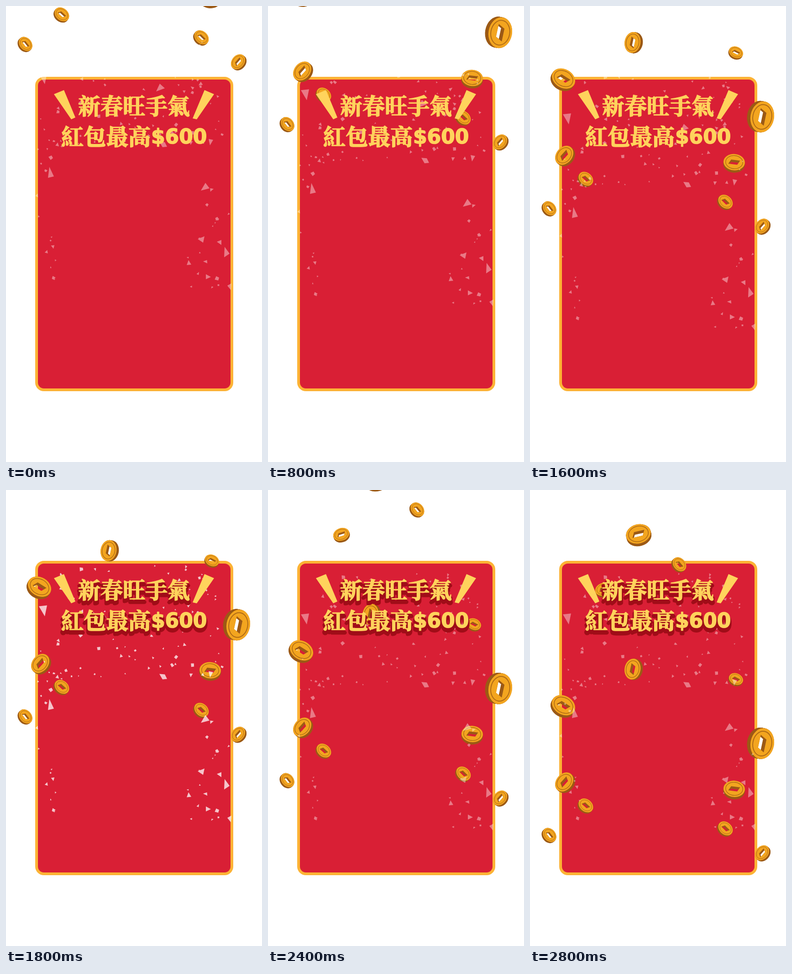
An HTML page with a canvas for the animation above (3.1 s loop, 561 by 998 pixels).

```html
<!DOCTYPE html>
<html lang="zh-Hant">
<head>
<meta charset="utf-8">
<style>
  html, body { margin: 0; width: 100%; height: 100%; overflow: hidden; background: #fff; }
  canvas { display: block; }
</style>
</head>
<body>
<canvas id="stage" width="561" height="998"></canvas>
<script>
const ctx = document.getElementById('stage').getContext('2d');
const LOOP = 3100, TICK = 200, LAST_TICK = 14, ROW = 17.6;
const GOLD = '#ffd35c', FACE = '#f3a51f', EDGE = '#9c5a16', RED = '#d91f35', SHADE = '#a00d18';

// x, y, radius and tilt of each coin at the start of the loop
const coins = [
  [43, 83, 17, 50], [122.5, 18.2, 17.5, 40], [428.5, 68.5, 17.5, 42], [508.5, 122, 18, -50],
  [75, -33, 23, -50], [447.5, -18, 23.5, 5], [509, -117, 34, 100], [73.5, -201, 27, 30],
  [224.7, -280, 23, -80], [451.5, -258.5, 16, 25], [327.5, -509.5, 17, 48],
  [160.5, -455, 18, -20], [237.5, -576, 27.5, -15]
];

// Coins fall slowly, speed up halfway and hesitate once: [tick, distance]
const fallKeys = [[0, 0], [7, 307], [11, 518], [12, 552], [14, 672]];

function fallAt(tick) {
  const next = Math.max(1, fallKeys.findIndex(([key]) => key >= tick));
  const [t0, d0] = fallKeys[next - 1], [t1, d1] = fallKeys[next];
  return d0 + (d1 - d0) * (tick - t0) / (t1 - t0);
}

// Confetti drops a row every two ticks, later every three; title shadow blinks along
function stateAt(tick) {
  const early = tick < 8, settled = tick >= 12;
  const row = early ? Math.floor(tick / 2) : 3 + Math.floor(tick / 3);
  const raised = early ? row % 2 === 1 : settled || tick % 3 === 0;
  const alpha = raised && !settled ? .52 + .036 * row : .4;
  return { row, raised, alpha, fall: fallAt(tick) };
}

let seed = 7;
function random() {
  seed = (seed * 16807) % 2147483647;
  return seed / 2147483647;
}

const confetti = new Path2D(
  'M95 352l10 21-13 3z M72 149l18-2-5 24z M337 170l11 10-19 7z M437 387l9 12-19 5z ' +
  'M420 510l15-6-3 14z M479 527l11 15-12 8z M336 297l12 1 5 10-10 1z M444 291l10 2-7 12z ' +
  'M396 567l4-11 6 10z M438 587l11 6-11 5z M462 516l10-4v11z M485 612l9-5-1 15z');

function addPiece(x, y, radius, corners) {
  const piece = new Path2D(), turn = random() * 6.28;
  for (let i = 0; i < corners; i++) {
    const angle = turn + (i + random() * .4) * 6.28 / corners;
    piece.lineTo(x + Math.cos(angle) * radius, y + Math.sin(angle) * radius);
  }
  piece.closePath();
  confetti.addPath(piece);
}

// A larger bias gathers the pieces towards the bottom of the area
function scatter(count, left, bottom, width, height, bias) {
  for (let i = 0; i < count; i++) {
    addPiece(left + random() * width, bottom - height * random() ** bias,
      2 + 3.5 * random() ** 2, i % 3 ? 3 : 4);
  }
}

scatter(80, 120, 308, 355, 260, 1.5);
scatter(15, 68, 610, 48, 300, .7);
scatter(16, 397, 618, 98, 270, 1.5);
scatter(7, 75, 320, 60, 130, 1);

function drawCard() {
  ctx.beginPath();
  ctx.roundRect(67, 158, 428, 682, 16);
  ctx.fillStyle = RED;
  ctx.fill();
  ctx.strokeStyle = '#fcb335';
  ctx.lineWidth = 6;
  ctx.stroke();
}

const disc = new Path2D(), groove = new Path2D();
disc.arc(0, 0, 1, 0, Math.PI * 2);
groove.arc(0, 0, .8, 0, Math.PI * 2);
const hole = new Path2D('M-.54 .25L-.3-.29 .54-.25 .3 .29z');

function drawCoin([x, y, radius, tilt], fall) {
  const matrix = new DOMMatrix().translate(x, y + fall).rotate(tilt).scale(radius, radius * .76);
  const ring = new Path2D(), line = new Path2D();
  ring.addPath(disc, matrix);
  ring.addPath(hole, matrix);
  line.addPath(groove, matrix);

  // The rim is a sweep of rings, so the hole stays see-through
  const angle = tilt * Math.PI / 180;
  ctx.fillStyle = EDGE;
  for (let depth = radius * .22; depth > 0; depth -= .6) {
    ctx.save();
    ctx.translate(-Math.sin(angle) * depth, Math.cos(angle) * depth);
    ctx.fill(ring, 'evenodd');
    ctx.restore();
  }
  ctx.fillStyle = FACE;
  ctx.fill(ring, 'evenodd');
  ctx.strokeStyle = '#ad6916';
  ctx.lineWidth = radius / 18;
  ctx.stroke(line);
}

function drawConfetti({ row, alpha }) {
  ctx.save();
  ctx.translate(0, row * ROW);
  ctx.globalAlpha = alpha;
  ctx.fillStyle = '#fff';
  ctx.fill(confetti);
  ctx.restore();
}

const HAN = '900 49px "Noto Serif CJK TC", "Noto Serif CJK JP", "Noto Sans CJK TC", "Noto Sans CJK JP", "Noto Sans CJK", serif';
const lines = [
  ['新春旺手氣', 158, 237, HAN],
  ['紅包最高', 121, 304, HAN],
  ['$600', 318, 301, 'bold 44px "DejaVu Sans", sans-serif']
];

function drawLines(color, weight, drop) {
  ctx.fillStyle = ctx.strokeStyle = color;
  ctx.lineWidth = weight;
  ctx.lineJoin = 'round';
  for (const [text, x, y, font] of lines) {
    ctx.font = font;
    ctx.strokeText(text, x, y + drop);
    ctx.fillText(text, x, y + drop);
  }
}

function drawTitle(raised) {
  if (raised) drawLines(SHADE, 7, 6.5);
  drawLines(GOLD, 1.6, 0);
  ctx.fill(new Path2D('M105 193L127 184 152 244 143 248z M435 184L456 193 418 248 409 246z'));
}

function draw(now) {
  const state = stateAt(Math.min(LAST_TICK, Math.floor((now % LOOP) / TICK)));
  ctx.fillStyle = '#fff';
  ctx.fillRect(0, 0, 561, 998);
  drawCard();
  for (const coin of coins) drawCoin(coin, state.fall);
  drawConfetti(state);
  drawTitle(state.raised);
}

const start = performance.now();
function frame() {
  draw(performance.now() - start);
  requestAnimationFrame(frame);
}
frame();
</script>
</body>
</html>
```
